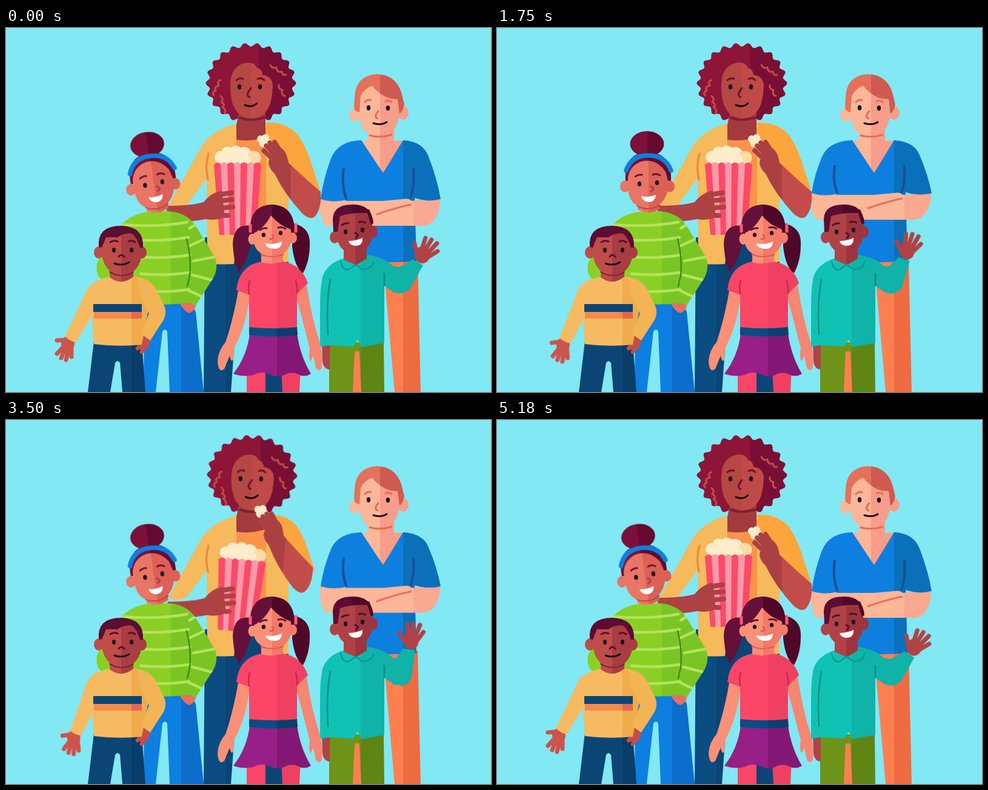
An HTML page for the animation above (5250 ms loop, 800 by 600 pixels).

```html
<!DOCTYPE html>
<html lang="en">
<head>
<meta charset="utf-8">
<title>Family with popcorn</title>
<style>
html, body { margin: 0; width: 100%; height: 100%; overflow: hidden; background: #82e8f3; }
svg { display: block; width: 800px; height: 600px; }
.ln { fill: none; stroke-linecap: round; stroke-linejoin: round; }
.ink { stroke: #1b0c18; stroke-width: 3; }
.finger { stroke-width: 8; }
g { animation: 5250ms ease-in-out infinite; }

.tilt { transform-origin: 250px 300px; animation-name: tilt; }
@keyframes tilt { 0%, 1.33%, 48.2%, 100% { transform: rotate(-7.7deg); } 10.67%, 38.67% { transform: none; } }

.sleeves { transform-origin: 617px 186px; animation-name: sleeves; }
@keyframes sleeves { 0%, 5.7%, 76%, 100% { transform: none; } 19%, 63% { transform: scaleY(.9); } }
.folded { animation-name: folded; }
@keyframes folded { 0%, 5.7%, 76%, 100% { transform: none; } 19%, 63% { transform: translateY(-10px); } }

.swing { transform-origin: 140px 430px; animation-name: swing; }
@keyframes swing { 0%, 28.5%, 87.6%, 100% { transform: none; } 36.2%, 79% { transform: rotate(-6deg); } }

.lift { animation-name: lift; }
@keyframes lift { 0%, 33.3%, 65%, 100% { transform: none; } 42%, 57.3% { transform: translateY(-2.5px); } }
.armL { transform-origin: 392px 430px; animation-name: armL; }
@keyframes armL { 0%, 33.3%, 65%, 100% { transform: none; } 42%, 57.3% { transform: rotate(3deg); } }
.armR { transform-origin: 488px 430px; animation-name: armR; }
@keyframes armR { 0%, 33.3%, 65%, 100% { transform: none; } 42%, 57.3% { transform: rotate(-4deg); } }

.nod { transform-origin: 404px 150px; animation-name: nod; }
@keyframes nod { 0%, 54.67%, 90.67%, 100% { transform: none; } 69.5%, 75.8% { transform: translateX(1px) rotate(1deg); } }
.bucket { transform-origin: 382px 300px; animation-name: bucket; }
@keyframes bucket { 0%, 54.67%, 90.67%, 100% { transform: none; } 69.5%, 75.8% { transform: translate(1px, 8px) rotate(5.5deg); } }
.grip { animation-name: grip; }
@keyframes grip { 0%, 54.67%, 90.67%, 100% { transform: none; } 69.5%, 75.8% { transform: translate(2px, 7px); } }
.bite { transform-origin: 435px 205px; animation-name: bite; }
@keyframes bite { 0%, 54.67%, 90.67%, 100% { transform: none; } 69.5%, 75.8% { transform: translate(-7px, -37px) rotate(5.6deg); } }
.cuff { transform-origin: 462px 160px; animation-name: cuff; }
@keyframes cuff { 0%, 54.67%, 90.67%, 100% { transform: none; } 69.5%, 75.8% { transform: scale(.84, .82); } }

.wave { transform-origin: 652px 420px; animation: wave 525ms cubic-bezier(.364, 0, .636, 1) -70ms infinite alternate; }
@keyframes wave { from { transform: rotate(1deg); } to { transform: rotate(-24deg); } }

.eyes { fill: #1b0c18; }
.eyes ellipse { transform-box: fill-box; transform-origin: center; animation: blink 5250ms var(--at) infinite; }
@keyframes blink { 0%, 4%, 100% { transform: none; } 1.33%, 2.67% { transform: scale(1.5, .25); } }
</style>
</head>
<body>
<svg viewBox="0 0 800 600">
<defs id="defs"></defs>

<!-- man -->
<path fill="url(#manPants)" d="M568 520H592V600H568ZM626 380H679L684 600H641L626 430Z"/>
<path fill="url(#skinMan)" d="M597 160H640V186H658L622 242 584 186H597Z"/>
<path fill="url(#shirtMan)" d="M566 196L586 185 622 239 655 185 676 196 673 230 677 384Q640 388 560 384V220Z"/>
<g class="folded">
  <path fill="url(#armMan)" d="M519 280Q515 312 527 326L690 326Q714 322 717 280L669 285Q665 280 655 282L622 285H562Z"/>
  <path class="ln" stroke="#e96f60" stroke-width="3" d="M668 291Q640 297 612 307"/>
</g>
<g class="sleeves">
  <path fill="#0d80df" d="M586 185Q548 186 536 215 523 250 519 282 540 289 562 283V220Z"/>
  <path fill="#0b70ba" d="M655 185Q688 187 697 212 711 248 717 282 694 288 671 279L668 225Z"/>
  <path class="ln" stroke="#1a4f94" stroke-width="4" d="M557 232Q553 258 561 281M672 232Q674 258 668 279"/>
</g>
<path fill="url(#skinMan)" d="M581 110Q590 88 615 88 645 88 648 110L649 140Q645 178 615 179 586 179 583 145Z"/>
<ellipse cx="575" cy="143" rx="9" ry="11" fill="#fcb698"/>
<ellipse cx="655" cy="140" rx="9" ry="11" fill="#f79d89"/>
<path fill="url(#hairMan)" d="M574 130L575 115Q576 78 612 76 648 77 655 118L657 126Q655 137 649 141L646 117Q622 118 604 95 591 100 585 112L583 139Q575 138 574 130Z"/>
<path class="ln" stroke="#e66b56" stroke-width="3" d="M592 122Q597 117 602 119M626 121Q632 118 636 122M614 137Q606 147 613 149M600 177Q617 182 636 176"/>
<path class="ln ink" d="M606 157Q619 161 628 155"/>
<g class="eyes" style="--at:-3850ms"><ellipse cx="598" cy="131.500" rx="3.200" ry="4.200"/><ellipse cx="630" cy="132" rx="3.200" ry="4.200"/></g>

<!-- mother -->
<path fill="url(#jeansMom)" d="M328 345H466V600H427V420H384L371 600H326Z"/>
<path fill="#f6b95c" d="M331 215Q342 172 384 157L440 156Q466 158 480 175L466 250V385L456 388 429 350H380L376 389Q350 390 332 389Z"/>
<path fill="#fb9349" d="M380 165H429V352H380Z"/>
<path fill="#f6b95c" d="M384 157Q342 165 322 196L268 293Q283 300 298 292L332 246Z"/>
<path class="ln" stroke="#ee8a3c" stroke-width="3.500" d="M334 207Q328 227 333 250"/>
<g class="nod">
  <path id="curls" fill="url(#hairMom)"/>
  <path class="ln" stroke="#bf4d46" stroke-width="3" d="M354 86Q347 88 351 95 342 97 346 103 339 106 343 111M354 112Q360 118 355 122 363 127 357 130 364 136 361 140M436 61Q440 68 446 65 447 74 455 72 456 79 462 77M450 94Q449 101 456 102 453 110 460 112"/>
</g>
<path fill="#a33a3e" d="M385 135H428V180Q404 188 380 184V160Z"/>
<path class="ln" stroke="#7f2034" stroke-width="4" d="M386 148Q405 155 427 147"/>
<g class="nod">
  <path fill="url(#skinMom)" d="M370 100Q368 62 397 57 411 56 414 66 422 67 423 77 440 80 440 96 439 118 434 129 425 149 403 149 371 146 370 100Z"/>
  <path class="ln" stroke="#74112f" stroke-width="3" d="M380 86Q386 81 391 84M415 84Q421 81 426 86M404 99Q394 112 402 114"/>
  <path class="ln ink" d="M394 127Q406 132 414 124"/>
  <g class="eyes" style="--at:-5000ms"><ellipse cx="385" cy="97" rx="3.200" ry="4.200"/><ellipse cx="419" cy="97" rx="3.200" ry="4.200"/></g>
</g>
<g class="bucket">
  <g fill="#feeccb">
    <circle cx="354" cy="213" r="10"/><circle cx="365" cy="205" r="9.500"/><circle cx="379" cy="205" r="11"/><circle cx="393" cy="208" r="12"/><path d="M348 212H414V230H348Z"/>
  </g>
  <circle cx="409" cy="214" r="11.500" fill="#fddca6"/><circle cx="397" cy="218" r="8" fill="#feeccb"/>
  <path fill="#fb4a68" d="M343 225Q349 219 354 224 360 219 365 224 371 219 376 224 382 219 387 224 393 219 398 224 404 219 409 224 415 219 421 225L412 341H352Z"/>
  <path fill="#fd9aa8" d="M354 224Q360 219 365 224L369 341H360.500ZM376 224Q382 219 387 224L386 341H378ZM398 224Q404 219 409 224L403 341H395Z"/>
</g>
<g class="grip">
  <path fill="#ae4144" d="M265 293Q305 293 326 287 337 272 356 268L361 312Q345 318 330 315 300 321 266 320Z"/>
  <path class="ln finger" stroke="#ae4144" d="M350 275L372 271.500M350 285L373 283M352 297L374 295M350 309L366 309"/>
</g>
<g class="cuff"><path fill="#fca53c" d="M430 156Q464 156 482 177 493 192 502 218L518 267Q495 272 467 255L466 230Q448 190 430 180Z"/></g>
<g class="bite">
  <g fill="#feeccb"><circle cx="420" cy="183" r="6"/><circle cx="428" cy="181" r="6"/><circle cx="424" cy="190" r="6.500"/><circle cx="432" cy="187" r="5"/></g>
  <path fill="url(#armMom)" d="M433 222Q435 207 454 198 463 203 466 222 490 245 519 270 521 300 508 312 500 316 489 306 460 275 443 240 434 232 433 222Z"/>
  <path class="ln" stroke="#ab4042" stroke-width="7.500" d="M441 217L425 202M446 212L429 194M450 208L435 189M456 208L443 188"/>
</g>

<!-- girl with bun -->
<path fill="url(#jeansGirl)" d="M228 450L305 450 313 468 326 600H270L266 500Q262 494 258 500L247 600H227Z"/>
<path fill="#e8705f" d="M290 444L314 455Q311 468 302 470 292 466 287 454Z"/>
<clipPath id="sweater"><path id="sweaterShape" d="M188 327Q205 307 234 303L268 302Q298 304 312 325L343 375Q352 393 342 412L313 457 289 447 303 408 302 453Q265 458 227 454L215 410 160 415Q147 410 150 388L172 345Z"/></clipPath>
<use href="#sweaterShape" fill="url(#knit)"/>
<path class="ln" clip-path="url(#sweater)" stroke="#b4e25c" stroke-width="4.500" d="M190 324Q250 329 299 320M185 347Q250 354 301 345M220 377Q260 381 303 374M222 405Q260 409 303 403M226 433Q260 437 302 431M303 330L322 319M303 359L335 344M309 384L346 377M307 407L342 416M298 431L326 444"/>
<path class="ln" stroke="#3f8f14" stroke-width="2.500" d="M298 348Q306 378 303 408L299 426"/>
<g class="tilt">
  <path fill="url(#skinGirl)" d="M232 270H268V299Q249 309 232 299Z"/>
  <path class="ln" stroke="#b6403f" stroke-width="3" d="M232 293Q249 302 268 292"/>
  <ellipse cx="247.500" cy="191" rx="28" ry="21" fill="url(#hairGirl)"/>
  <path fill="url(#hairGirl)" d="M212 252Q209 205 249 205 289 205 287 252Z"/>
  <path fill="url(#skinGirl)" d="M216 246Q219 227 238 220 262 214 278 237L284 258Q278 297 248 297 217 296 216 262Z"/>
  <ellipse cx="211" cy="261" rx="8" ry="9.500" fill="#e97565"/><ellipse cx="285" cy="261" rx="8" ry="9.500" fill="#dc6055"/>
  <path class="ln" stroke="#0d80df" stroke-width="7.500" stroke-linecap="butt" d="M213 235Q221 210 249 210 278 210 287 235"/>
  <path class="ln" stroke="#6b0f35" stroke-width="2.800" d="M228 245Q233 241 239 242M257 242Q264 239 269 243"/>
  <path class="ln" stroke="#b03a40" stroke-width="2.800" d="M254 261Q262 266 254 269"/>
  <path fill="#fff" d="M238 277Q250 280 262 275 261 287 250 287 240 286 238 277Z"/>
  <g class="eyes" style="--at:-4450ms"><ellipse cx="235" cy="257" rx="3.200" ry="4"/><ellipse cx="264" cy="255" rx="3.200" ry="4"/></g>
</g>

<!-- boy in striped top -->
<path fill="url(#pantsBoy)" d="M145 516L224 518 230 600H192L188 552Q184 546 180 552L172 600H135Z"/>
<g class="swing">
  <ellipse cx="102" cy="520" rx="11" ry="12" fill="#cc544c"/>
  <path class="ln" stroke="#cc544c" stroke-width="7" d="M102 514L84 515M98 522L84 537M99 524L91 544M104 526L99 547M108 524L108 542"/>
  <path fill="#f6bb62" d="M156 415Q135 420 127 445L97 508Q105 516 115 518L147 466Z"/>
</g>
<path fill="#c44e4a" d="M226 500L239 512Q237 527 228 533L216 527Z"/>
<path class="ln" stroke="#c44e4a" stroke-width="6.500" d="M227 510L213 511M226 514L213 519M228 518L217 528M232 520L224 534"/>
<path fill="url(#topBoy)" d="M138 428Q150 413 172 410L210 409Q232 413 242 425L224 522Q185 526 145 521Z"/>
<path fill="#0b4576" d="M144 455H224V468H144Z"/><path fill="url(#bandBoy)" d="M145 468H224V479H145Z"/>
<path fill="#f3b455" d="M215 410Q240 414 248 432L261 458Q266 469 260 481L238 515 222 504 236 471 225 448Z"/>
<path fill="url(#skinBoy)" d="M172 398H210V410Q190 426 171 411Z"/>
<path class="ln" stroke="#7b2135" stroke-width="3.500" d="M172 402Q190 412 209 402"/>
<path fill="url(#skinBoy)" d="M157 345Q165 332 190 332 216 332 221 345L225 365Q222 407 190 407 160 406 157 365Z"/>
<ellipse cx="153" cy="370" rx="8" ry="10" fill="#bf4d49"/><ellipse cx="224" cy="370" rx="8" ry="10" fill="#a83e41"/>
<path fill="url(#hairKid)" d="M153 361Q150 326 190 326 228 327 226 362L221 362Q216 345 208 339 195 337 184 345L165 345 158 362Z"/>
<path class="ln" stroke="#5c0d33" stroke-width="3" d="M172 353Q178 349 184 352M202 352Q208 349 213 353M186 377Q190 371 195 377"/>
<path class="ln ink" d="M179 388Q191 393 203 386"/>
<g fill="#1b0c18"><ellipse cx="178" cy="366" rx="3" ry="4"/><ellipse cx="207" cy="366" rx="3" ry="4"/></g>

<!-- boy waving -->
<path fill="url(#pantsWave)" d="M533 518H623L624 600H586L583 535Q579 530 575 535L572 600H533Z"/>
<path fill="#b04246" d="M521 522H534V563Q523 562 522 548Z"/>
<g class="wave">
  <ellipse cx="687" cy="374" rx="12.500" ry="14" fill="#b04246"/>
  <path class="ln" stroke="#b04246" stroke-width="7" d="M679 376L674 355M685 369L692 346M690 369L702 349M694 373L711 355M694 379L712 368"/>
  <path fill="#0fb3a8" d="M638 398Q656 392 671 381L688 391 667 429Q657 441 643 436Z"/>
</g>
<path fill="url(#shirtWave)" d="M556 380Q530 388 522 410 518 430 518 460V526L532 523 573 525 580 514 586 526 624 519V425L640 436Q655 439 662 424L652 395Q646 394 638 392 620 376 594 374Z"/>
<path class="ln" stroke="#0a8a8c" stroke-width="2.500" d="M535 415Q528 450 531 505M624 424V405"/>
<path fill="url(#skinWave)" d="M557 362H595V380L577 391 557 382Z"/>
<path class="ln" stroke="#0a9a98" stroke-width="2.500" d="M552 385Q555 400 565 398L577 390 588 398Q604 397 606 386"/>
<path fill="url(#skinWave)" d="M546 299H600L606 336Q600 372 576 372 550 371 546 346Z"/>
<ellipse cx="542" cy="345" rx="8" ry="10" fill="#b04246"/><ellipse cx="606" cy="336" rx="7" ry="10" fill="#9e353e"/>
<path fill="url(#hairKid)" d="M540 336L539 315Q540 291 571 291 604 290 606 322L602 324 596 305Q570 304 551 310L547 336Z"/>
<path class="ln" stroke="#5c0d33" stroke-width="3" d="M554 325Q559 321 565 322M582 320Q588 318 593 321M576 338Q584 341 577 346"/>
<path fill="#fff" d="M565 351Q578 351 588 346 589 358 578 359 567 359 565 351Z"/>
<g fill="#1b0c18"><ellipse cx="560" cy="336" rx="3" ry="4"/><ellipse cx="588" cy="333" rx="3" ry="4"/></g>

<!-- girl with pigtails -->
<path fill="url(#shirtGirl)" d="M397 560H428V600H397ZM454 560H486L484 600H456Z"/>
<g class="lift">
  <g class="armL"><path fill="#fb9076" d="M384 428L403 436Q396 492 376 528L375 547Q371 552 369 540L360 562Q350 570 349 548 351 530 362 518 375 480 384 428Z"/></g>
  <g class="armR"><path fill="#f58672" d="M477 437L496 424Q504 478 518 520 523 540 521 560 516 568 511 560L507 540 503 549Q498 546 501 528 489 480 477 437Z"/></g>
</g>
<path fill="url(#skirt)" d="M402 503H480Q485 540 503 570 492 577 480 570 468 566 457 573 445 577 434 570 420 565 408 572 392 576 375 570 398 540 402 503Z"/>
<g class="lift">
  <path fill="url(#belt)" d="M401 492H480L481 506Q440 511 401 506Z"/>
  <path fill="url(#shirtGirl)" d="M380 432Q384 392 421 385L457 385Q488 390 498 421L480 438V493Q440 497 401 493V440Z"/>
  <path class="ln" stroke="#c9274f" stroke-width="2.500" d="M401 438Q399 426 402 417M480 437Q481 427 478 417"/>
  <path fill="url(#hairPig)" d="M403 326Q376 322 374 355 376 390 384 402 398 385 404 355ZM474 322Q500 328 501 352 502 382 490 404 476 395 472 360Z"/>
  <path fill="url(#skinPig)" d="M421 365H457V385Q438 391 421 386Z"/>
  <path class="ln" stroke="#df5b58" stroke-width="3" d="M421 373Q439 380 457 373"/>
  <path fill="url(#hairPig)" d="M403 340Q399 293 438 291 477 292 476 338Z"/>
  <path class="ln" stroke="#fb5b78" stroke-width="5" d="M403 325V335M478 324V335"/>
  <path fill="url(#skinPig)" d="M409 338Q426 330 437 309 450 325 470 332L471 350Q465 376 439 376 411 375 408 350Z"/>
  <ellipse cx="406" cy="348" rx="6.500" ry="9" fill="#fb9076"/><ellipse cx="473" cy="346" rx="7" ry="9" fill="#f37a68"/>
  <path class="ln" stroke="#5c0d33" stroke-width="2.800" d="M419 333Q424 329 430 330M449 329Q456 327 461 331"/>
  <path class="ln" stroke="#df5b58" stroke-width="2.800" d="M439 341Q445 347 436 348"/>
  <path fill="#fff" d="M427 355Q441 358 455 352 455 364 443 364 431 364 427 355Z"/>
  <g class="eyes" style="--at:-290ms"><ellipse cx="425" cy="341" rx="3.200" ry="3.600"/><ellipse cx="453" cy="338" rx="3.200" ry="3.600"/></g>
</g>
</svg>
<script>
// Two-tone fills: light side, dark side, and the x where they meet.
const tones = {
  manPants: [655, '#fc7f50', '#ef6b42'], skinMan: [617, '#fcb698', '#f79d89'],
  shirtMan: [655, '#0d80df', '#0b70ba'], armMan: [672, '#fcb698', '#f9a892'],
  hairMan: [617, '#e4715a', '#cf5a50'], jeansMom: [362, '#0b4d83', '#0a4576'],
  hairMom: [417, '#8e1538', '#7a0f35'], skinMom: [404, '#b54843', '#bf4a47'],
  armMom: [470, '#ab4042', '#c24c49'], jeansGirl: [289, '#0c7fe0', '#0d6dca'],
  knit: [272, '#8ad024', '#7ac524'], skinGirl: [250, '#e97565', '#dc6055'],
  hairGirl: [248, '#7c1038', '#640a31'], pantsBoy: [207, '#0b4576', '#093d6a'],
  topBoy: [207, '#f6bb62', '#f0ac4c'], bandBoy: [207, '#f58a4b', '#e9664a'],
  skinBoy: [190, '#bf4d49', '#a83e41'], hairKid: [570, '#5c0d33', '#500829'],
  pantsWave: [585, '#6e9419', '#5f8514'], shirtWave: [585, '#0fc2b4', '#0fb3a8'],
  skinWave: [576, '#b04246', '#9e353e'], skinPig: [439, '#fb9076', '#f37a68'],
  shirtGirl: [447, '#fb4668', '#f04062'], skirt: [447, '#971f86', '#841876'],
  belt: [447, '#0b4d83', '#0a3f70'], hairPig: [439, '#64103a', '#500829']
};
document.getElementById('defs').innerHTML = Object.entries(tones).map(([id, [x, light, dark]]) =>
  `<linearGradient id="${id}" gradientUnits="userSpaceOnUse" x1="0" x2="800" y1="0" y2="0">` +
  `<stop offset="${x / 800}" stop-color="${light}"/><stop offset="${x / 800}" stop-color="${dark}"/></linearGradient>`
).join('');

// Wavy outline of the curly hair.
const points = Array.from({ length: 360 }, (_, i) => {
  const a = i * Math.PI / 180, bump = 3 * Math.cos(22 * a);
  return `${404 + (71.5 + bump) * Math.cos(a)} ${91 + (63.5 + bump) * Math.sin(a)}`;
});
document.getElementById('curls').setAttribute('d', `M${points.join('L')}Z`);
</script>
</body>
</html>
```
